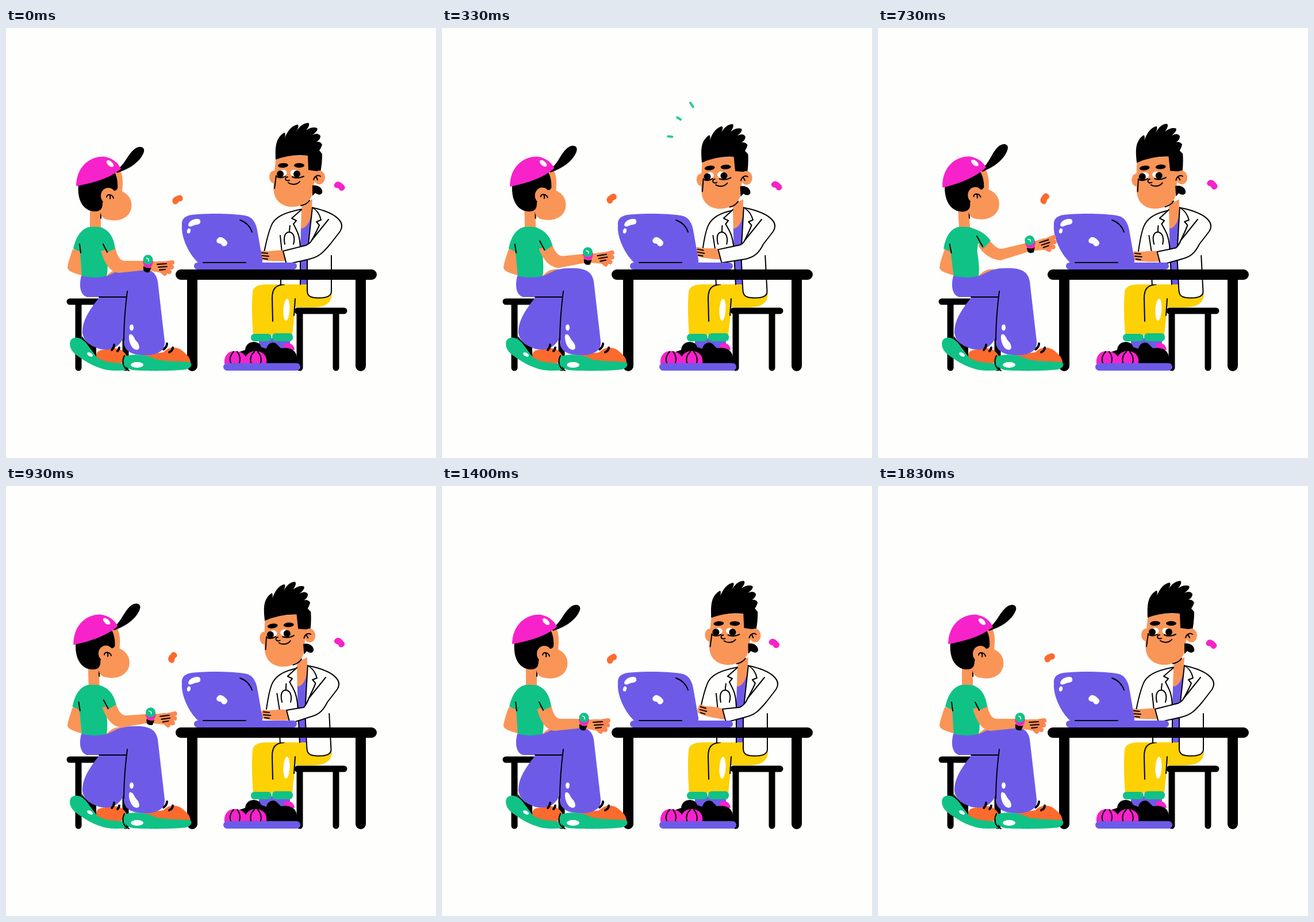
These frames come from a looping animation (748x748 px, 1.86 s). An HTML page:

```html
<!DOCTYPE html>
<html lang="en">
<head>
<meta charset="utf-8">
<title>Consultation</title>
<style>
html, body { margin: 0; height: 100%; overflow: hidden; background: #fefefd; }
svg { display: block; width: 100vw; height: 100vh; }
.ink { fill: none; stroke: #000; stroke-width: 2; stroke-linecap: round; stroke-linejoin: round; }
.bar { fill: none; stroke: #000; stroke-linecap: round; }
.coat { fill: #fefefd; stroke: #000; stroke-width: 2; stroke-linejoin: round; stroke-linecap: round; }
.skin { fill: #fa9558; } .violet { fill: #6d5be8; } .pink { fill: #f722ca; }
.green { fill: #10c286; } .yellow { fill: #fdd104; } .orange { fill: #fc6a2d; }
.white { fill: #fff; }
</style>
</head>
<body>
<svg viewBox="0 0 748 748">
  <defs>
    <path id="bean" d="M-9 2C-9-4-3-6 5-6C11-6 11 2 8 4C6 6 3 4 1 5C-2 9-9 9-9 2Z"/>
  </defs>

  <!-- doctor: stool, legs, shoes -->
  <path class="bar" stroke-width="11" d="M507 492H588M511 494V591M574 494V591"/>
  <path class="yellow" d="M429 460C430 449 440 446 455 446H524L530 462L567 462C566 480 555 486 530 486H503L498 534H430C428 510 427 480 429 460Z"/>
  <path class="ink" d="M484 446C468 447 463 455 463 470L464 510M503 471L501 500"/>
  <ellipse class="white" cx="488" cy="490" rx="5.5" ry="19" transform="rotate(3 488 490)"/>
  <path class="violet" d="M440 540H494V558H440Z"/>
  <path class="pink" d="M484 549Q500 545 502 560H484Z"/>
  <rect class="green" x="426" y="532" width="36" height="13" rx="6"/>
  <rect class="green" x="463" y="531" width="36" height="14" rx="6"/>
  <path d="M398 566L416 560C417 550 424 546 432 546Q442 547 444 555L453 558C455 548 464 545 470 549L478 557C498 554 509 562 506 585H398Z"/>
  <path class="pink" d="M380 584C379 568 388 561 400 562C413 563 420 571 419 584ZM415 584C414 569 424 561 436 562C449 563 455 572 453 584Z"/>
  <path class="ink" d="M396 563Q387 572 391 583M402 563Q409 571 406 583M432 563Q423 571 426 583M438 563Q446 572 443 583"/>
  <rect class="violet" x="378" y="583" width="134" height="13" rx="6.5"/>

  <!-- doctor: torso -->
  <path id="side" class="coat"/>
  <g id="torso">
    <path fill="#fefefd" d="M515 316L478 340V446H524V456C524 465 528 468 536 469C556 471 566 467 566 458V380L584 345C580 328 560 318 535 313Z"/>
    <path class="violet" d="M510 338L512 446H524L526 372L533 318Z"/>
    <path class="skin" d="M516 306L533 298L531 325C528 340 521 348 514 349C509 340 512 318 516 306Z"/>
    <path class="ink" d="M477 361L480 390M478 410V446M524 400V456C524 465 528 468 536 469C556 471 566 467 566 458V396"/>
    <path class="coat" d="M514 316L497 331L505 335L500 341C508 356 511 362 512 382"/>
    <path class="coat" d="M533 312C541 317 546 325 548 334L540 337L545 343C538 360 530 370 525 385Z"/>
    <path class="ink" d="M494 344Q493 350 493 355M485 376C482 362 486 355 493 355C501 356 503 366 500 376M512 382V446"/>
  </g>
  <g id="typing">
    <path class="skin" d="M486 388C472 384 458 391 444 387Q439 392 442 402C452 406 474 406 490 405Z"/>
    <path class="ink" d="M445 391L455 392M445 396L457 397M447 401L455 402"/>
  </g>
  <path id="sleeve" class="coat"/>

  <!-- doctor: head -->
  <g id="doctor">
    <ellipse class="skin" cx="466" cy="259" rx="8" ry="11"/>
    <path class="skin" d="M470 222C467 250 464 270 466 286C469 304 485 311 497 311C512 311 527 305 532 292L545 222Z"/>
    <path d="M469 229C468 207 469 191 484 182Q487 182 485 191Q493 171 507 168Q511 169 505 180Q514 165 526 165Q530 168 522 178Q532 171 541 174Q544 178 533 186Q543 181 547 188Q547 194 540 198Q547 197 550 203Q548 209 545 213L550 219Q550 236 547 250L526 247L525 222Q496 219 469 229Z"/>
    <path d="M533 274C545 272 552 281 550 287Q546 293 538 287L533 292Z"/>
    <ellipse class="skin" cx="545" cy="260" rx="10" ry="12"/>
    <path class="ink" d="M535 264C537 257 543 255 547 258M539 258L542 264M470 257L467 279M513 309Q523 307 528 300"/>
    <ellipse cx="482" cy="239" rx="9" ry="4" transform="rotate(-4 482 239)"/>
    <ellipse cx="510" cy="239" rx="9" ry="4"/>
    <g id="open">
      <ellipse class="white" cx="482" cy="252" rx="6.5" ry="5.5"/>
      <ellipse class="white" cx="501" cy="252" rx="6.5" ry="5.5"/>
      <circle cx="477" cy="254" r="6"/><circle cx="506" cy="254" r="6"/>
      <path class="ink" d="M470 258Q477 263 486 258M498 259Q508 263 518 258"/>
    </g>
    <path id="shut" class="ink" d="M469 260Q477 264 485 260M496 261Q505 256 517 262"/>
    <path class="ink" d="M493 265C485 268 484 259 490 259M491 269C498 274 507 272 511 267"/>
  </g>

  <!-- table and laptop -->
  <path class="bar" stroke-width="18" d="M304 429H636M324 433V588M617 433V588"/>
  <rect class="violet" x="327" y="408" width="179" height="12" rx="6"/>
  <path class="violet" d="M306 344C305 328 315 325 335 324C362 322 395 323 414 326C431 328 436 342 438 357L446 403C447 412 442 414 434 414H342C322 402 304 366 306 344Z"/>
  <path class="ink" d="M343 408H417M407 334C418 338 425 346 428 355"/>
  <path class="white" d="M317 343C318 334 331 330 337 333Q341 340 333 342C326 342 320 349 317 343Z"/>
  <ellipse class="white" cx="318" cy="353" rx="3" ry="4.5" transform="rotate(15 318 353)"/>
  <use href="#bean" class="white" transform="translate(376 371) rotate(48)"/>

  <!-- patient: stool, torso, legs, shoes -->
  <path class="bar" stroke-width="11" d="M111 476H200M126 478V591M208 500V591"/>
  <path class="skin" d="M116 385C112 396 108 408 107 416C107 422 113 425 134 431L129 386Z"/>
  <g id="shirt">
    <path class="skin" d="M146 310H165V350H146Z"/>
    <path class="green" d="M145 346C129 350 121 366 117 384L129 389L132 435H174C178 425 177 405 175 388L180 360L167 347Q156 345 145 346Z"/>
    <path class="ink" d="M128 376L130 391M165 321V331"/>
  </g>
  <path class="skin" d="M174 432C182 424 190 418 203 420L206 432Z"/>
  <path class="violet" d="M163 468C145 490 132 510 133 530C135 550 158 560 178 560C195 556 205 545 208 525L212 466Z"/>
  <path d="M132 536Q142 551 157 556V573Q140 560 131 545Z"/>
  <path class="orange" d="M157 573C156 558 168 560 180 559C194 553 208 562 211 574Q204 582 195 585Q170 584 157 573Z"/>
  <path class="green" d="M111 549C112 535 130 535 141 550L158 573C172 583 192 582 206 584L211 595Q180 598 165 592C148 587 132 576 120 567Q111 559 111 549Z"/>
  <ellipse class="white" cx="146" cy="568" rx="5.5" ry="3" transform="rotate(30 146 568)"/>
  <path class="bar" stroke-width="4" d="M184 560Q188 556 188 551M194 562Q197 559 197 556"/>
  <path class="orange" d="M233 573C246 563 264 567 274 564C284 553 298 555 305 560C313 567 321 572 321 583H262Z"/>
  <path class="bar" stroke-width="4" d="M274 559Q280 555 280 549M284 564Q290 561 290 556"/>
  <path class="violet" d="M131 431Q154 437 177 431C190 425 200 418 218 418C250 416 261 424 264 441L276 545C278 562 262 570 240 569C217 569 205 560 205 546L209 468H141C128 464 127 447 131 431Z"/>
  <path class="ink" d="M162 468H210M211 458C207 490 205 520 205 543"/>
  <ellipse class="white" cx="218.5" cy="521" rx="3.5" ry="5.5"/>
  <path class="white" d="M215 533C222 531 222 541 229 547C235 557 231 563 222 558C215 552 212 537 215 533Z"/>
  <path class="green" d="M205 572C219 566 244 567 262 577C282 580 302 580 320 581C325 585 322 592 313 594C290 597 240 597 220 595C206 591 202 582 205 572Z"/>
  <path class="ink" d="M206 570C201 580 203 592 214 596"/>
  <ellipse class="white" cx="228" cy="586" rx="11" ry="5"/>

  <!-- patient: head -->
  <g id="patient">
    <path class="skin" d="M150 275L198 246C205 260 203 273 202 284C217 291 221 305 217 317C212 332 194 337 181 334C168 333 162 326 164 310Z"/>
    <path d="M126 272C123 304 138 320 157 319C166 318 168 312 168 304L178 282C187 283 191 285 194 279C195 265 192 256 188 249Z"/>
    <ellipse class="skin" cx="178" cy="292" rx="13" ry="14"/>
    <path class="ink" d="M175 294C176 288 185 289 187 296M180 290Q182 292 181 297"/>
    <path d="M190 248C206 240 210 222 223 211C233 203 244 207 239 218C231 236 210 247 193 252Z"/>
    <path class="pink" d="M122 275C122 243 145 222 172 224Q192 228 200 245C180 262 150 270 122 275Z"/>
    <ellipse class="white" cx="181" cy="236" rx="7.5" ry="4" transform="rotate(42 181 236)"/>
  </g>

  <!-- patient: near arm -->
  <path id="arm" class="skin"/>
  <path id="cuff" class="green"/>
  <path id="fold" class="ink"/>
  <g id="hand">
    <path class="skin" d="M242 405C256 408 265 405 274 406L276 427Q262 424 242 421Z"/>
    <g fill="none" stroke="#fb8650" stroke-width="8" stroke-linecap="round">
      <path d="M270 411L289 408M272 415L288 416M272 419L284 424M270 421L276 427"/>
    </g>
    <path class="ink" d="M263 411L279 410M265 416L280 415M267 421L277 420"/>
    <path d="M239 414Q248 420 253 416L249 425Q241 426 239 421Z"/>
    <path class="pink" d="M238 405H256Q255 418 247 417Q238 416 238 405Z"/>
    <circle class="green" cx="247" cy="403" r="8.5"/>
    <path d="M244 400L248 402L248 406" fill="none" stroke="#fff" stroke-width="1.5"/>
  </g>

  <!-- accents -->
  <use id="chip" href="#bean" class="orange"/>
  <use id="petal" href="#bean" class="pink"/>
  <g id="sparks" fill="none" stroke="#2cc99b" stroke-linecap="round">
    <path/><path/><path/>
  </g>
</svg>
<script>
const LOOP = 1860;
const $ = id => document.getElementById(id);
const set = (id, name, value) => $(id).setAttribute(name, value);
const move = (id, value) => set(id, 'transform', value);

// Eased value from [time, value] keys
function key(t, ...keys) {
  let [t0, v0] = keys[0];
  if (t <= t0) return v0;
  for (const [t1, v1] of keys) {
    if (t < t1) {
      const u = (t - t0) / (t1 - t0);
      return v0 + (v1 - v0) * u * u * (3 - 2 * u);
    }
    [t0, v0] = [t1, v1];
  }
  return v0;
}

// Blend two paths with the same commands
function blend(a, b, w) {
  const ends = b.match(/[\d.]+/g);
  let i = 0;
  return a.replace(/[\d.]+/g, n => (+n + (ends[i++] - n) * w).toFixed(2));
}

const ARM = ['M190 382C194 398 198 404 206 405L243 405L243 421L196 426C180 424 172 410 165 388',
             'M194 370C202 378 208 385 216 384L262 373L265 388L214 404C196 403 182 392 174 378'];
const CUFF = ['M165 347C182 352 188 368 190 384L176 390L168 374L160 360Z',
              'M160 347C178 352 190 360 196 370L183 384L172 372L160 360Z'];
const FOLD = ['M169 376L176 390', 'M172 362L182 380'];
const SIDE = ['M515 315C485 321 467 328 461 345C455 360 452 375 449 390',
              'M507 317C485 321 468 330 462 346C457 359 455 375 453 388'];
const SPARKS = [[424, 191.7, 393, 188.5], [434, 171, 409, 155.5], [452, 160, 432, 130]];

function drawPatient(t) {
  const reach = key(t, [250, 0], [440, 1], [720, 1], [1040, 0]);
  const lean = key(t, [250, 0], [440, 1], [740, 1], [1110, 0]);
  move('patient', `translate(${-6 * lean}) rotate(${-4 * lean} 160 330)`);
  move('shirt', `translate(0 434) skewX(${3.3 * lean}) translate(0 -434)`);
  set('arm', 'd', blend(...ARM, reach));
  set('cuff', 'd', blend(...CUFF, reach));
  set('fold', 'd', blend(...FOLD, reach));
  move('hand', `translate(${19 * reach} ${-34 * reach}) rotate(${-14 * reach} 247 412)`);
}

function drawDoctor(t) {
  const x = key(t, [60, 0], [200, -8], [380, -13], [1100, -13], [1230, -10], [1420, 0]);
  const y = key(t, [60, 0], [190, 4.5], [380, 2], [1100, 2], [1230, 4], [1420, 0]);
  const tilt = key(t, [150, 0], [400, -4], [1200, -4], [1440, 0]);
  const lean = key(t, [60, 0], [300, 1], [1080, 1], [1430, 0]);
  move('doctor', `translate(${x} ${y}) rotate(${tilt} 515 315)`);
  move('torso', `translate(0 468) skewX(${3 * lean}) translate(0 -468)`);
  set('side', 'd', blend(...SIDE, lean));

  const cx = key(t, [0, 0], [200, -3], [470, 0], [930, 6], [1570, 6], [1830, 0]);
  const cy = key(t, [0, 0], [200, -5], [470, 0], [930, 2], [1230, 0]);
  const lift = key(t, [0, 0], [200, 9], [470, 1], [930, 0], [1230, 10], [1570, 11], [1830, 0]);
  const s = -5 * lean;
  move('typing', `translate(${cx * .5} ${cy}) rotate(${lift} 484 396)`);
  set('sleeve', 'd', `M${561 + s} 333L${532 + s} 369Q${528 + s} ${377 + cx / 2} 518 ${379 + cx}L${482 + cx} ${388 + cy}` +
    `L${488 + cx} ${411 + cy}L528 402C545 398 552 390 ${564 + s} 376L${581 + s} 354C${592 + s} 337 ${572 + s} 321 ${535 + 1.6 * s} 313`);

  const closed = t > 1130 && t < 1330;
  set('open', 'display', closed ? 'none' : 'inline');
  set('shut', 'display', closed ? 'inline' : 'none');
}

function drawAccents(t) {
  const a = t / LOOP * 2 * Math.PI, c = Math.cos(a + .25);
  move('chip', `translate(${293.5 + 4.5 * c} ${298 - 2 * Math.sin(a)}) rotate(${-30 + 16 * c})`);
  move('petal', `translate(${580.5 + 2.3 * Math.sin(a)} ${273 + 1.5 * Math.cos(a)}) rotate(${52 - 4 * Math.cos(a)})`);

  const u = (t - 90) / 290;
  const live = u > 0 && u < 1;
  set('sparks', 'display', live ? 'inline' : 'none');
  if (!live) return;
  const inner = u ** 1.5, outer = 1 - (1 - u) ** 3;
  set('sparks', 'stroke-width', 8 * Math.min(1, u * 5, (1 - u) * 3));
  SPARKS.forEach(([x0, y0, x1, y1], i) => {
    const at = k => `${x0 + (x1 - x0) * k} ${y0 + (y1 - y0) * k}`;
    $('sparks').children[i].setAttribute('d', `M${at(inner)}L${at(outer)}`);
  });
}

const start = performance.now();
function draw() {
  const t = (performance.now() - start) % LOOP;
  drawPatient(t);
  drawDoctor(t);
  drawAccents(t);
  requestAnimationFrame(draw);
}
draw();
</script>
</body>
</html>
```
